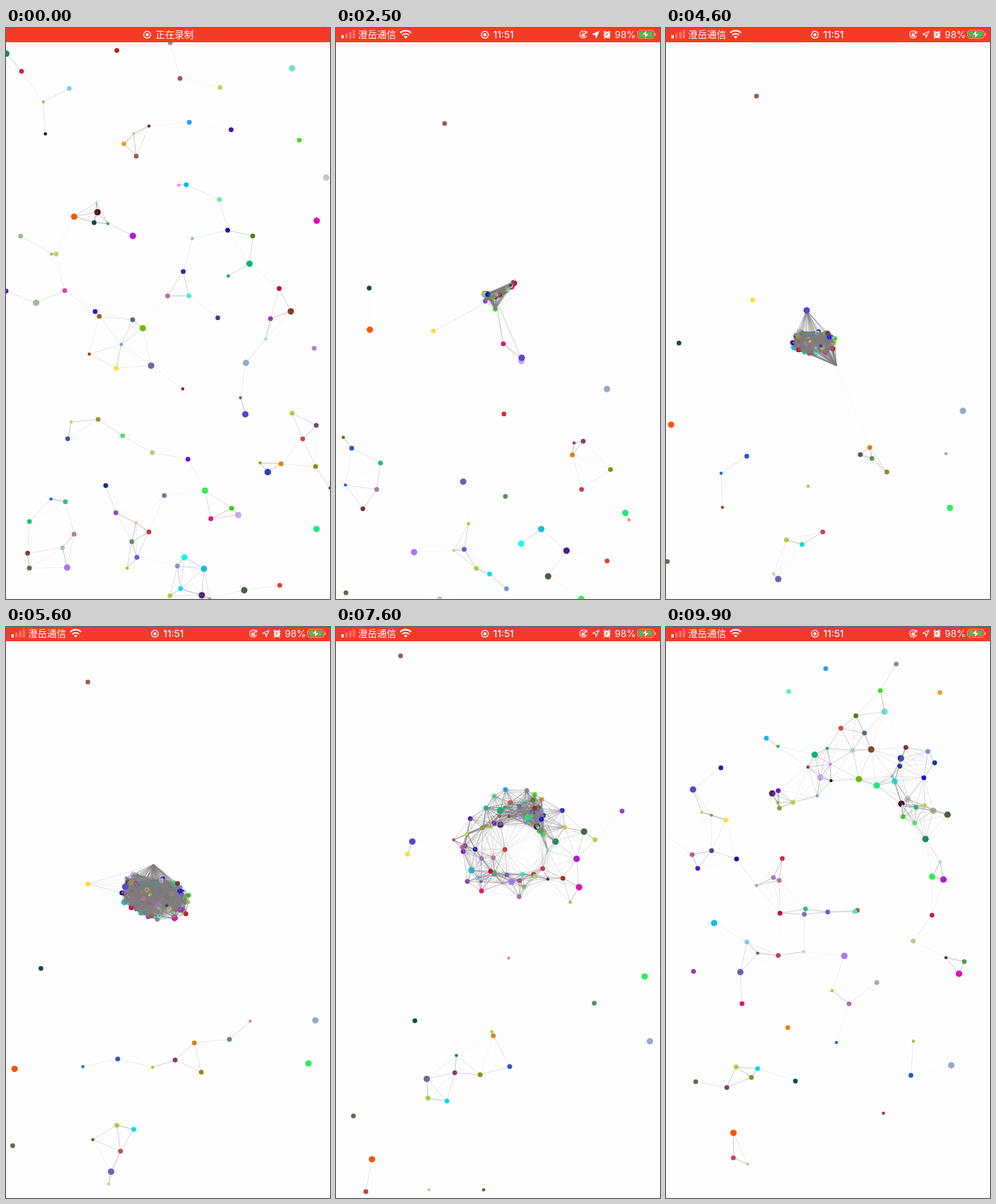
Recreate the animation shown at these times as an HTML page with a canvas. Size 544 px wide and 960 px high, loop 10000 ms.

```html
<!DOCTYPE html>
<html lang="zh">
<head>
<meta charset="utf-8">
<title>Particle network</title>
<style>
html, body { margin: 0; width: 100%; height: 100%; overflow: hidden; background: #fdfdfe; }
canvas { position: absolute; left: 0; top: 0; }
#bar { position: absolute; left: 0; top: 0; width: 544px; height: 23.5px; color: #fff;
  font: 16px/22px Inter, "Noto Sans CJK SC", "Noto Sans CJK JP", sans-serif; }
#bar span { position: absolute; top: 0; white-space: nowrap; }
#bar svg { position: absolute; left: 0; top: 0; }
#clock { font-weight: 500; }
</style>
</head>
<body>
<canvas id="stage" width="544" height="960"></canvas>
<div id="bar">
  <svg width="544" height="24" fill="none" stroke="#fff">
    <g id="rec" stroke-width="1.5"><circle r="5.8"/><circle r="2.6" fill="#fff" stroke="none"/></g>
    <g class="side">
      <g fill="#fff" stroke="none">
        <rect x="9" y="12" width="4" height="5.5" rx="1"/>
        <g opacity=".3"><rect x="15.5" y="9.5" width="4" height="8" rx="1"/><rect x="22" y="6.5" width="4" height="11" rx="1"/><rect x="28" y="3.5" width="4" height="14" rx="1"/></g>
        <path d="M117 18l-3-3.4a4.5 4.5 0 0 1 6 0z"/>
      </g>
      <path d="M111.3 12a8 8 0 0 1 11.4 0M108 8.3a12.6 12.6 0 0 1 18 0" stroke-width="2.4"/>
      <path d="M420.4 8a6 6 0 1 0 .4 5M421 5v3.5h-3.5" stroke-width="1.3"/>
      <path d="M413.4 11v-1.4a1.7 1.7 0 0 1 3.4 0V11" stroke-width="1"/>
      <rect x="412.3" y="10.6" width="5.6" height="4" rx=".6" fill="#fff" stroke="none"/>
      <path id="arrow" d="M441.5 5.5l-10.5 5 5 .8.7 5.2z" stroke-width="1.3" stroke-linejoin="round"/>
      <circle cx="455" cy="11.5" r="5.4" fill="#fff" stroke="none"/>
      <path d="M449.6 7.6l2.6-2.6M460.4 7.6l-2.6-2.6M451.4 16l-1.3 1.6M458.6 16l1.3 1.6" stroke-width="1.8"/>
      <path d="M455 8v3.8h-2.8" stroke="#f63a28" stroke-width="1.2"/>
      <rect x="506.5" y="4" width="27.5" height="13.5" rx="4" stroke-opacity=".6"/>
      <rect x="508.5" y="6" width="23" height="9.5" rx="2.3" fill="#3bc751" stroke="none"/>
      <path d="M536 8.5v4.5" stroke-width="1.6" stroke-opacity=".6"/>
      <path d="M522 3.5l-8 8h5l-1.5 6.5 8-8.3h-5z" fill="#fff" stroke="#f63a28" stroke-width=".7"/>
    </g>
  </svg>
  <span class="side" style="left:37px">澄岳通信</span>
  <span id="note">正在录制</span>
  <span id="clock">11:51</span>
  <span class="side" style="left:468px">98%</span>
</div>
<script>
const W = 544, H = 960, LOOP = 10000, STEP = 100;
const LINK = 6000, PULL = 27000, RELEASE = 6900;
const SWARM = 82, STRAYS = 10;
const $ = id => document.getElementById(id);
const ctx = $('stage').getContext('2d');
const clamp = v => Math.max(0, Math.min(1, v));
const mix = (a, b, p) => a + (b - a) * p;
const smooth = p => p * p * (3 - 2 * p);

let seed = 11;
const rand = () => (seed = seed * 16807 % 2147483647) / 2147483647;
const spread = n => (rand() * 2 - 1) * n;
const anyColor = () => `rgb(${[0, 0, 0].map(() => Math.floor(rand() * 256))})`;
const anySize = () => [2.6, 4, 4, 5.4][Math.floor(rand() * 4)];

// The pointer's stops, and the ring or blob that the held dots form there
const stops = [
  { t: 1400, hand: [211, 171], x: 262, y: 205, rx: 98, ry: 98, inner: 0.94, tilt: 0, from: 0.5, to: 1.8, tail: 0 },
  { t: 3600, hand: [325, 737], x: 246, y: 602, rx: 17, ry: 3, inner: 0, tilt: -0.55, from: 0, to: 6.28, tail: 0 },
  { t: 5600, hand: [248, 399], x: 254, y: 454, rx: 65, ry: 38, inner: 0, tilt: 0.2, from: 0, to: 6.28, tail: 0 },
  { t: 6800, hand: [296, 358], x: 292, y: 364, rx: 37, ry: 35, inner: 0.6, tilt: 0, from: 0, to: 6.28, tail: 95 },
];

const dots = [];

// Swarm dots drift until the pointer takes them, then burst apart on release
for (let i = 0; i < SWARM; i++) {
  const x = rand() * W, y = 24 + rand() * (H - 24);
  dots.push({
    color: anyColor(), r: anySize(), x, y, vx: spread(35), vy: spread(35), t0: 0,
    taken: 4 * Math.hypot(x - 250, y - 250),
    turn: rand(), depth: Math.sqrt(rand()), lag: rand() ** 5, speed: 40 + 130 * rand() ** 2,
  });
}

// Drifters keep a straight course: place at 6800 ms and speed per second
const drift = (color, r, x, y, vx, vy) => dots.push({ color, r, x, y, vx, vy, t0: 6800 });
drift('#965f4b', 4, 120, 66, -14.5, -22);
drift('#e88000', 4, 285, 692, -26, -6);
drift('#ff5500', 5.4, 42, 834, 23, 76);
drift('#66664a', 4, 22, 842, 9, -25);
drift('#cc4444', 4, 107, 922, -71, 34);
drift('#a84400', 2.6, 207, 929, 51, 56);
drift('#e88a8e', 2.6, 338, 599, -60, -53);
drift('#33ee55', 5.4, 543, 646, -31, -73);
drift('#6666aa', 5.4, 162, 822, -12, -78);
drift('#2a55c0', 4, 250, 734, 52, 6.4);
drift('#5548cc', 5.4, 157, 391, -36, -38);
drift('#ffdd33', 4, 127, 402, -8.5, -25);
for (let i = 0; i < STRAYS; i++) drift(anyColor(), anySize(), rand() * W, mix(600, H, rand()), spread(50), spread(50));

// Bounce between 0 and size
function fold(v, size) {
  const m = ((v % (2 * size)) + 2 * size) % (2 * size);
  return m > size ? 2 * size - m : m;
}

function free(d, t) {
  const s = (t - d.t0) / 1000;
  return { x: fold(d.x + d.vx * s, W), y: fold(d.y + d.vy * s, H) };
}

function between(t, place) {
  let k = 0;
  while (k < stops.length - 2 && t >= stops[k + 1].t) k++;
  const a = stops[k], b = stops[k + 1], p = clamp((t - a.t) / (b.t - a.t));
  const [ax, ay] = place(a), [bx, by] = place(b);
  return { x: mix(ax, bx, p), y: mix(ay, by, p) };
}

function held(d, t) {
  return between(t, s => {
    const a = mix(s.from, s.to, d.turn), n = mix(s.inner, 1, d.depth);
    const dx = s.rx * n * Math.cos(a);
    return [s.x + dx + s.tail * d.lag, s.y + s.ry * n * Math.sin(a) + s.tilt * dx];
  });
}

function place(d, t) {
  const own = free(d, t);
  if (d.taken === undefined) return own;
  const grip = held(d, t), p = smooth(clamp((t - d.taken) / 250));
  const out = d.speed * Math.max(0, t - RELEASE) / 1500, a = d.turn * 2 * Math.PI;
  return { x: mix(own.x, grip.x, p) + out * Math.cos(a), y: mix(own.y, grip.y, p) + out * Math.sin(a) };
}

function link(a, b, reach) {
  const near = 1 - ((a.x - b.x) ** 2 + (a.y - b.y) ** 2) / reach;
  if (near <= 0) return;
  ctx.lineWidth = near * 0.65;
  ctx.strokeStyle = `rgba(128,124,126,${Math.min(1, near + 0.2)})`;
  ctx.beginPath();
  ctx.moveTo(a.x, a.y);
  ctx.lineTo(b.x, b.y);
  ctx.stroke();
}

function drawNet(t) {
  ctx.fillStyle = '#fdfdfe';
  ctx.fillRect(0, 0, W, H);
  const at = dots.map(d => place(d, t));
  const hand = t >= 700 && t < 7600 ? between(t, s => s.hand) : null;
  dots.forEach((d, i) => {
    ctx.fillStyle = d.color;
    ctx.beginPath();
    ctx.arc(at[i].x, at[i].y, d.r, 0, 7);
    ctx.fill();
    if (hand) link(at[i], hand, PULL);
    for (let j = i + 1; j < at.length; j++) link(at[i], at[j], LINK);
  });
}

function drawBar(t) {
  const dip = Math.max(0, Math.cos((t - 1400) / 2700 * 2 * Math.PI)) ** 4;
  $('bar').style.background = `rgb(${mix(246, 222, dip)},${mix(58, 52, dip)},40)`;
  const p = smooth(clamp((t - 1200) / 300)), x = mix(237, 250, p);
  $('rec').setAttribute('transform', `translate(${x} 11.3)`);
  $('note').style.left = $('clock').style.left = x + 14 + 'px';
  $('note').style.opacity = 1 - p;
  $('clock').style.opacity = p;
  $('arrow').setAttribute('fill', t < 4500 ? '#fff' : 'none');
  for (const el of document.querySelectorAll('.side')) el.style.opacity = clamp((t - 1400) / 300);
}

const start = performance.now();
let last = -1;
function tick() {
  const t = Math.floor((performance.now() - start) % LOOP / STEP) * STEP;
  if (t !== last) {
    last = t;
    drawNet(t);
    drawBar(t);
  }
  requestAnimationFrame(tick);
}
tick();
</script>
</body>
</html>
```
